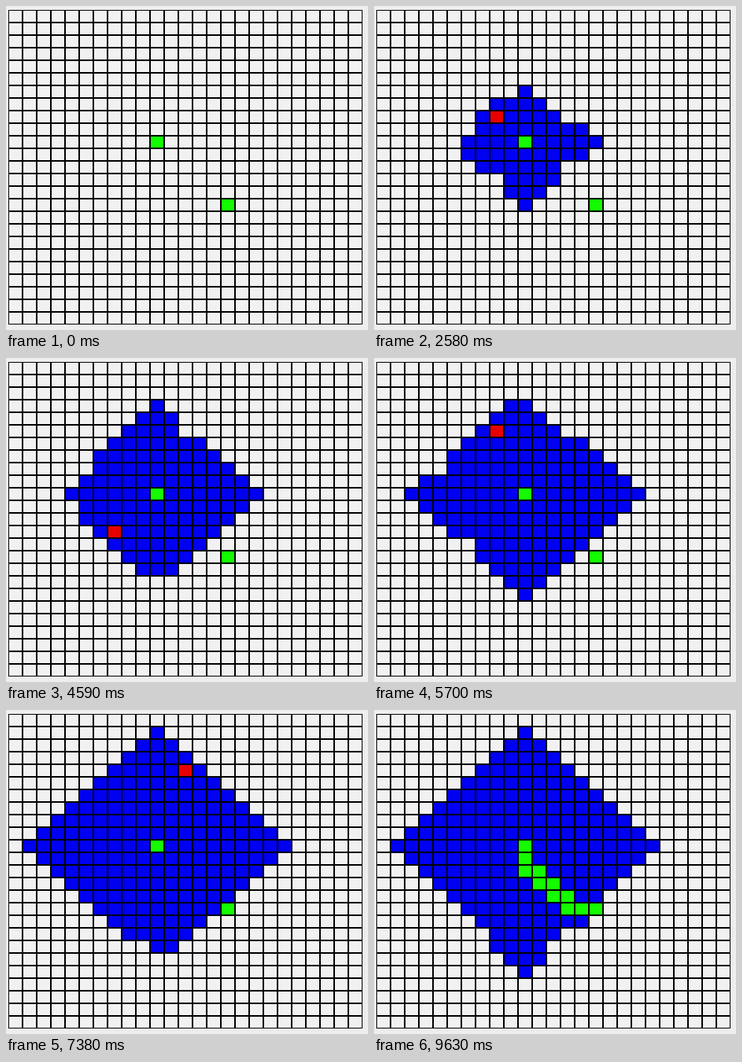
These frames come from a looping animation (460 by 412 pixels, 9.66 s). A matplotlib script:

```python
import numpy as np
import matplotlib.pyplot as plt
from matplotlib.animation import FuncAnimation
from matplotlib.collections import PolyCollection
from matplotlib.colors import to_rgba
from matplotlib.patches import Rectangle

W, H, DPI = 460, 412, 64
N = 25                        # cells per side
X0, Y0, CW, CH = 3, 5, 18, 16
STEP, FRAMES = 30, 322
START, GOAL = (10, 10), (15, 15)
MOVES = [(0, 1), (0, -1), (1, 0), (-1, 0)]

EMPTY, BLUE, RED, GREEN = map(
    to_rgba, ("#f1f1f1", "#0000f2", "#e80000", "#14fb00"))


class Heap:
    """Binary min-heap that leaves equal keys where they are."""

    def __init__(self, key):
        self.items, self.key = [], key

    def push(self, item):
        a, k = self.items, len(self.items)
        a.append(item)
        while k and self.key(item) < self.key(a[(k - 1) // 2]):
            a[k] = a[(k - 1) // 2]
            k = (k - 1) // 2
        a[k] = item

    def pop(self):
        a = self.items
        top, last = a[0], a.pop()
        n, k = len(a), 0
        if not n:
            return top
        while 2 * k + 1 < n:
            c = 2 * k + 1
            if c + 1 < n and self.key(a[c]) > self.key(a[c + 1]):
                c += 1
            if self.key(last) <= self.key(a[c]):
                break
            a[k] = a[c]
            k = c
        a[k] = last
        return top


def search():
    """Dijkstra: expansion order, cells found at each step, and the path."""
    dist, parent = {START: 0}, {}
    heap = Heap(dist.get)
    heap.push(START)
    order, found = [], []
    while GOAL not in dist:
        cell = heap.pop()
        order.append(cell)
        new = []
        for dx, dy in MOVES:
            nxt = cell[0] + dx, cell[1] + dy
            if nxt in dist or not (0 <= nxt[0] < N and 0 <= nxt[1] < N):
                continue
            dist[nxt], parent[nxt] = dist[cell] + 1, cell
            new.append(nxt)
            if nxt == GOAL:
                break
            heap.push(nxt)
        found.append(new)
    path, cell = [], parent[GOAL]
    while cell != START:
        path.append(cell)
        cell = parent[cell]
    return order, found, path


order, found, path = search()

# The pace drifts a little, so a few cells fix the clock.
PACE = [(START, 1250), ((9, 8), 1820), ((11, 14), 3308), ((7, 13), 4568),
        ((8, 5), 5690), ((12, 4), 7358), (order[-1], 7730)]
pop_time = np.interp(range(len(order)),
                     [order.index(c) for c, _ in PACE],
                     [t for _, t in PACE])
path_time = 7825 + 97 * np.arange(len(path))

fig = plt.figure(figsize=(W / DPI, H / DPI), dpi=DPI, facecolor="#eeeeee")
ax = fig.add_axes([0, 0, 1, 1])
ax.set_xlim(0, W)
ax.set_ylim(H, 0)
ax.axis("off")
ax.add_patch(Rectangle((X0, Y0), N * CW, N * CH, fc="black", lw=0,
                       antialiased=False))


def box(col, row):
    x, y = X0 + col * CW + 1, Y0 + row * CH + 1
    w, h = CW - 2, CH - 2
    return [(x, y), (x + w, y), (x + w, y + h), (x, y + h)]


cells = PolyCollection([box(c, r) for r in range(N) for c in range(N)],
                       linewidths=0, antialiaseds=False, zorder=2)
ax.add_collection(cells)


def draw(frame):
    t = frame * STEP
    grid = np.empty((N, N, 4))
    grid[:] = EMPTY

    def paint(cell, color):
        grid[cell[1], cell[0]] = color

    done = np.searchsorted(pop_time, t, side="right")
    for new in found[:done]:
        for cell in new:
            paint(cell, BLUE)
    if done and t < path_time[0]:
        paint(order[done - 1], RED)
    for cell, when in zip(path, path_time):
        if t >= when:
            paint(cell, GREEN)
    paint(START, GREEN)
    paint(GOAL, GREEN)
    cells.set_facecolor(grid.reshape(-1, 4))
    return [cells]


anim = FuncAnimation(fig, draw, frames=FRAMES, interval=STEP,
                     init_func=lambda: draw(0), repeat=True, repeat_delay=0)
plt.show()
```
